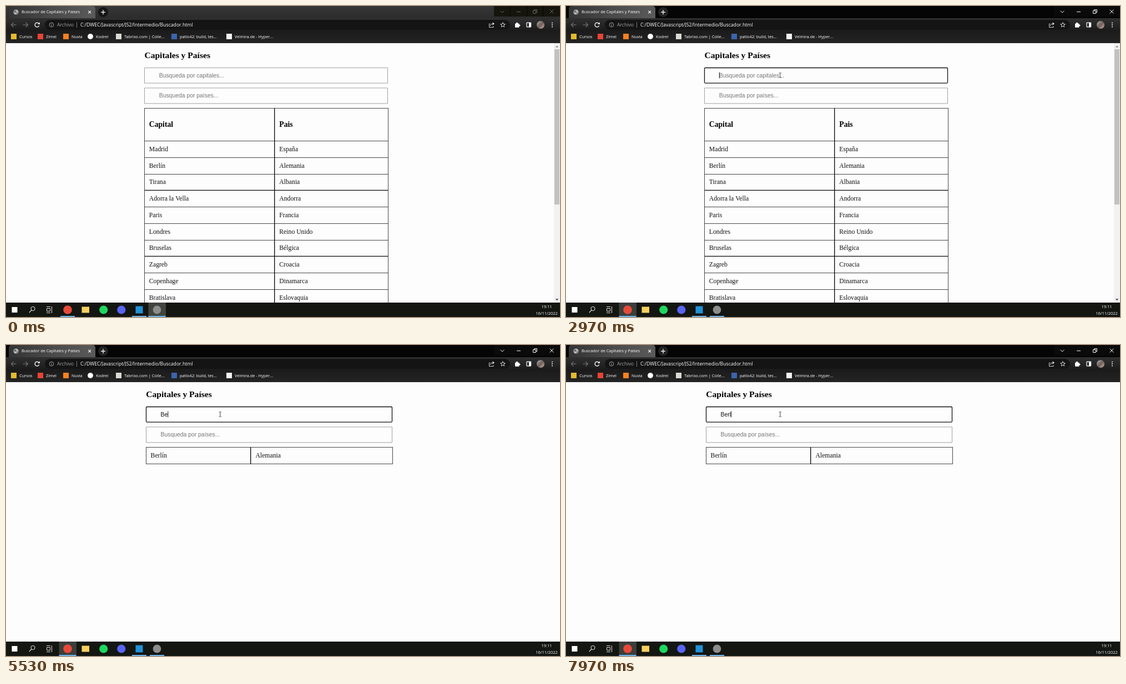
Write an HTML page with a canvas that moves like this. It is 998 px wide and 561 px high and loops after 8000 ms.

```html
<!DOCTYPE html>
<html lang="es">
<head>
<meta charset="utf-8">
<title>Buscador de Capitales y Países</title>
<style>
html, body { margin: 0; width: 100%; height: 100%; overflow: hidden; background: #fdfdfd; }
canvas { display: block; }
</style>
</head>
<body>
<canvas id="stage" width="998" height="561"></canvas>
<script>
const ctx = document.getElementById('stage').getContext('2d');
const LOOP = 8000;
const ACTIVE = 350;
const FOCUS = 2600;
const SERIF = '"Liberation Serif", "Times New Roman", serif';
const SANS = '"Liberation Sans", Arial, sans-serif';
const UI = '"Open Sans", "Noto Sans", sans-serif';
const CELL = '11.7px ' + SERIF;

const DATA = [
  ['Madrid', 'España'], ['Berlín', 'Alemania'], ['Tirana', 'Albania'],
  ['Adorra la Vella', 'Andorra'], ['Paris', 'Francia'], ['Londres', 'Reino Unido'],
  ['Bruselas', 'Bélgica'], ['Zagreb', 'Croacia'], ['Copenhage', 'Dinamarca'],
  ['Bratislava', 'Eslovaquia'], ['Luxemburgo', 'Luxemburgo'], ['Lisboa', 'Portugal']
];

// Time of each key press and the query it leaves
const KEYS = [
  [3640, 'b'], [4130, ''], [4600, 'B'], [5430, 'Be'], [5650, 'Ber'],
  [5850, 'Berl'], [6200, 'Berlí'], [6600, 'Berlín'], [7600, 'Berlí'], [7930, 'Berl']
];

const BOOKMARKS = [
  [14, '#e5b92c', 'Cursos', 24],
  [62, '#ea4335', 'Zimel', 72],
  [108, '#f58220', 'Nuvia', 118],
  [152, '#ffffff', 'Kodrel', 162, true],
  [203, '#d9dcd4', 'Tabrixo.com | Colle...', 213],
  [303, '#3b64ad', 'patlo42: build, tes...', 313],
  [402, '#f4f4f4', 'Velmira.de - Hyper...', 412]
];

function rect(x, y, w, h, color) {
  ctx.fillStyle = color;
  ctx.fillRect(x, y, w, h);
}

function box(x, y, w, h, r, color, width) {
  ctx.beginPath();
  ctx.roundRect(x, y, w, h, r);
  if (width) {
    ctx.strokeStyle = color;
    ctx.lineWidth = width;
    ctx.stroke();
  } else {
    ctx.fillStyle = color;
    ctx.fill();
  }
}

function disc(x, y, r, color) {
  ctx.beginPath();
  ctx.arc(x, y, r, 0, Math.PI * 2);
  ctx.fillStyle = color;
  ctx.fill();
}

function ring(x, y, r, color, width = 1, from = 0, to = Math.PI * 2) {
  ctx.beginPath();
  ctx.arc(x, y, r, from, to);
  ctx.strokeStyle = color;
  ctx.lineWidth = width;
  ctx.stroke();
}

function line(color, width, ...p) {
  ctx.beginPath();
  for (let i = 0; i < p.length; i += 2) ctx.lineTo(p[i], p[i + 1]);
  ctx.strokeStyle = color;
  ctx.lineWidth = width;
  ctx.stroke();
}

function shape(color, ...p) {
  ctx.beginPath();
  for (let i = 0; i < p.length; i += 2) ctx.lineTo(p[i], p[i + 1]);
  ctx.fillStyle = color;
  ctx.fill();
}

function text(str, x, y, font, color, align = 'left') {
  ctx.font = font;
  ctx.fillStyle = color;
  ctx.textAlign = align;
  ctx.fillText(str, x, y);
}

function widest(rows, col) {
  ctx.font = CELL;
  return Math.max(...rows.map(r => ctx.measureText(r[col]).width)) + 16.9;
}

function fade(x0, y0, x1, y1, ...colors) {
  const g = ctx.createLinearGradient(x0, y0, x1, y1);
  colors.forEach((c, i) => g.addColorStop(i / (colors.length - 1), c));
  return g;
}

function stateAt(t) {
  let query = '', last = t < FOCUS ? ACTIVE : FOCUS;
  for (const [at, value] of KEYS) {
    if (t >= at) { query = value; last = at; }
  }
  const active = t >= ACTIVE;
  return {
    query, active,
    focus: !active ? -1 : t < FOCUS ? 1 : 0,
    caret: active && (t - last) % 1000 < 500
  };
}

function drawTabs(active) {
  rect(0, 0, 998, 24, active ? '#050505' : fade(0, 0, 0, 24, '#363636', '#2b2b2b'));
  box(5, 0, 156, 28, [5, 5, 0, 0], fade(5, 0, 161, 0, '#343434', '#4a4a4a', '#5a5a5a'));
  disc(18, 11, 4.6, '#b8bcc0');
  shape('#6d7175', 15, 8, 18, 8, 19, 11, 16.5, 12.5, 14, 11);
  shape('#6d7175', 19, 12, 22, 11, 20.5, 14.5, 18.5, 15);
  text('Buscador de Capitales y Países', 28, 13.4, '7.35px ' + UI, '#fff');
  line('#fff', 1.2, 148.3, 8.7, 153, 13.4);
  line('#fff', 1.2, 153, 8.7, 148.3, 13.4);
  disc(175, 11, 9, active ? '#222' : '#151515');
  line('#fff', 1.3, 171, 11.2, 179, 11.2);
  line('#fff', 1.3, 175, 7.2, 175, 15.2);

  rect(879, 0, 119, 19, active ? '#0a0a0a' : '#15150d');
  if (!active) for (const x of [908, 938, 967]) rect(x, 0, 1, 19, '#050505');
  const c = active ? '#f0f0f0' : '#66665e';
  line(c, 1, 890.5, 8.5, 894, 12, 897.5, 8.5);
  line(c, 1, 920, 10.5, 927, 10.5);
  box(949.5, 8.5, 5, 5, 0, c, 1);
  line(c, 1, 951.5, 8, 951.5, 6.5, 956.5, 6.5, 956.5, 11.5, 955, 11.5);
  line(c, 1, 979.5, 6.5, 986.5, 13.5);
  line(c, 1, 986.5, 6.5, 979.5, 13.5);
}

function arrow(x, dir, color) {
  line(color, 1.1, x - 4.5, 34, x + 4.5, 34);
  line(color, 1.1, x + dir * 0.5, 30, x + dir * 4.5, 34, x + dir * 0.5, 38);
}

function drawToolbar() {
  rect(0, 22, 998, 45, fade(0, 22, 0, 67, '#303030', '#1b1b1b', '#242424'));
  box(70, 25, 838, 18, 9, '#141414');
  arrow(14, -1, '#777');
  arrow(35, 1, '#777');
  ring(56, 34, 3.9, '#fff', 1.3, 0.4, 5.5);
  shape('#fff', 57, 33, 60.8, 33, 60.8, 29.2);
  ring(82, 34, 3.9, '#aaa', 0.9);
  rect(81.5, 33.4, 1, 2.8, '#aaa');
  rect(81.5, 31.6, 1, 1, '#aaa');
  text('Archivo', 92, 37.2, '8.67px ' + UI, '#a2a2a2');
  rect(127, 29, 1, 10, '#777');
  text('C:/DWEC/Javascript/JS2/Intermedio/Buscador.html', 134, 37.2, '8.67px ' + UI, '#fff');

  line('#ddd', 0.9, 872, 32, 870.5, 32, 870.5, 38.5, 878, 38.5, 878, 36);
  line('#ddd', 0.9, 872.5, 36, 873.5, 32.8, 878.5, 32);
  shape('#ddd', 876.5, 29.3, 880, 32, 876.5, 34.6);

  ctx.beginPath();
  for (let i = 0; i < 10; i++) {
    const a = i * Math.PI / 5 - Math.PI / 2, r = i % 2 ? 2 : 4.5;
    ctx.lineTo(895 + r * Math.cos(a), 34.2 + r * Math.sin(a));
  }
  ctx.closePath();
  ctx.strokeStyle = '#eee';
  ctx.lineWidth = 0.9;
  ctx.stroke();

  box(917, 31.5, 7.5, 7.2, 1, '#fff');
  disc(920.5, 31, 1.5, '#fff');
  disc(925, 35, 1.5, '#fff');
  box(938, 30.2, 7.6, 7.6, 0.5, '#fff', 1.2);
  rect(942, 30, 4, 8, '#fff');
  disc(963, 34, 7, fade(957, 28, 969, 41, '#9ca3aa', '#725f57', '#c5b8b0'));
  for (const y of [30.6, 34, 37.4]) disc(984, y, 1, '#fff');

  for (const [x, color, label, tx, round] of BOOKMARKS) {
    if (round) disc(x, 55, 5, color);
    else rect(x - 5, 50, 10, 10, color);
    text(label, tx, 57.9, '7.35px ' + UI, '#fff');
  }
}

function drawInput(x, w, y, h, value, hint, focused, caret) {
  const left = x + 26.3;
  const edge = Math.round(x) + 0.5;
  if (focused) box(edge, y + 0.5, Math.round(w) - 1, h, 1.5, '#101010', 1.3);
  else box(edge, y + 0.5, Math.round(w) - 1, h, 0, '#a0a0a0', 1);
  text(value || hint, left, y + 17.6, '10.4px ' + SANS, value ? '#111' : '#757575');
  if (caret) rect(left + ctx.measureText(value).width + 0.1, y + 8.5, 1, 11, '#222');
}

function drawTable(x, w, rows, full) {
  const a = widest(rows, 0), b = widest(rows, 1);
  const mid = x + w * a / (a + b);
  const pitch = 29.75, top = 183.8;
  const first = full ? top + 59.3 : top;
  const bottom = first + rows.length * pitch;
  const thin = '#484848', bold = '#101010';
  const x0 = Math.round(x - 0.4), y0 = Math.round(top);
  const height = Math.round(bottom) - y0 + 1;

  rect(x0, y0, w, 1, thin);
  if (full) {
    text('Capital', x + 8.4, 217.8, 'bold 13.68px ' + SERIF, '#000');
    text('Pais', mid + 8.4, 217.8, 'bold 13.68px ' + SERIF, '#000');
  }
  for (let i = 0; i <= rows.length; i++) {
    const y = first + i * pitch;
    const heavy = i % 4 === (full ? 3 : 2);
    rect(x0, Math.round(y) - (heavy ? 0.2 : 0), w, heavy ? 1.3 : 1, heavy ? bold : thin);
    if (i < rows.length) {
      text(rows[i][0], x + 8.4, y + 18.8, CELL, '#111');
      text(rows[i][1], mid + 8.4, y + 18.8, CELL, '#111');
    }
  }
  const thick = full || rows.length === 1;
  rect(x0, y0, 1, height, thin);
  rect(Math.round(x + w - 0.6), y0, 1, height, thin);
  rect(Math.floor(mid - 0.2), y0, thick ? 1.4 : 1, height, thick ? bold : thin);
}

function drawPage(s) {
  const full = !s.query;
  const x = full ? 249.4 : 252.2;
  const w = full ? 439.2 : 444.2;
  ctx.save();
  ctx.beginPath();
  ctx.rect(0, 67, 998, 468);
  ctx.clip();
  rect(0, 67, 998, 468, '#fdfdfd');
  text('Capitales y Países', x, 94, 'bold 15.59px ' + SERIF, '#000');
  drawInput(x, w, 111, 27.6, s.query, 'Busqueda por capitales...', s.focus === 0, s.focus === 0 && s.caret);
  drawInput(x, w, 147.4, 28, '', 'Busqueda por países...', s.focus === 1, s.focus === 1 && s.caret);
  drawTable(x, w, DATA.filter(r => r[0].includes(s.query)), full);
  if (full) {
    rect(987, 67, 11, 468, '#f1f1f1');
    rect(988, 78, 9, 280, '#c1c1c1');
    shape('#8a8a8a', 989.8, 74.5, 992.5, 71.5, 995.2, 74.5);
    shape('#444', 989.8, 528.3, 992.5, 531.3, 995.2, 528.3);
  }
  ctx.restore();
}

function drawTaskbar(active) {
  rect(0, 535, 998, 26, '#141612');
  const sel = active ? 111 : 272;
  rect(sel - 15.5, 535, 31.5, 26, active ? '#3c3e3b' : '#41443f');
  for (const x of [111, 240, 272]) {
    const half = x === sel ? 15.5 : 13;
    rect(x - half, 559, half * 2, 2, '#6cb4ea');
  }
  rect(10.5, 543, 10, 10, '#fff');
  ring(48.5, 546, 3.6, '#eee', 1);
  line('#eee', 1.1, 46, 548.7, 41.8, 553);
  box(73.5, 545.5, 6, 5, 0, '#ddd', 1);
  line('#ddd', 1, 73, 542.5, 80, 542.5);
  line('#ddd', 1, 73, 553.5, 80, 553.5);
  line('#ddd', 1, 82.5, 542, 82.5, 554);
  disc(111, 548, 7.8, '#e64a37');
  rect(136.5, 542.5, 13.5, 11, '#f7cf60');
  disc(175.7, 548, 7.6, '#1ed760');
  disc(207.8, 548, 7.6, '#5865f2');
  rect(233.5, 541.5, 13, 13, '#2191d8');
  disc(272, 548, 7.4, '#8b8c8b');
  text('19:11', 974, 544.8, '7.5px ' + UI, '#fff', 'center');
  text('16/11/2022', 974, 556.7, '7.5px ' + UI, '#fff', 'center');
}

function drawPointer(t) {
  if (t < 1900) return;
  const p = Math.min((t - 1900) / 550, 1);
  const k = 1 - (1 - p) ** 3;
  const x = 1004 + (385.8 - 1004) * k;
  const y = 220 + (125 - 220) * k;
  if (x < 688 && y < 176) {
    for (const d of [-1, 1]) {
      const end = y + d * 4.3, notch = y + d * 3.6;
      line('#444', 0.9, x - 2.2, end, x - 0.6, end, x, notch, x + 0.6, end, x + 2.2, end);
    }
    line('#444', 1, x, y - 3.8, x, y + 3.8);
  } else {
    const tip = [x, y, x, y + 9, x + 2.1, y + 7.2, x + 3.6, y + 10.2, x + 4.8, y + 9.6, x + 3.5, y + 6.7, x + 6.3, y + 6.4, x, y];
    shape('#fff', ...tip);
    line('#222', 0.7, ...tip);
  }
}

function frame() {
  const t = performance.now() % LOOP;
  const s = stateAt(t);
  drawTabs(s.active);
  drawToolbar();
  drawPage(s);
  drawTaskbar(s.active);
  drawPointer(t);
  requestAnimationFrame(frame);
}
frame();
</script>
</body>
</html>
```
